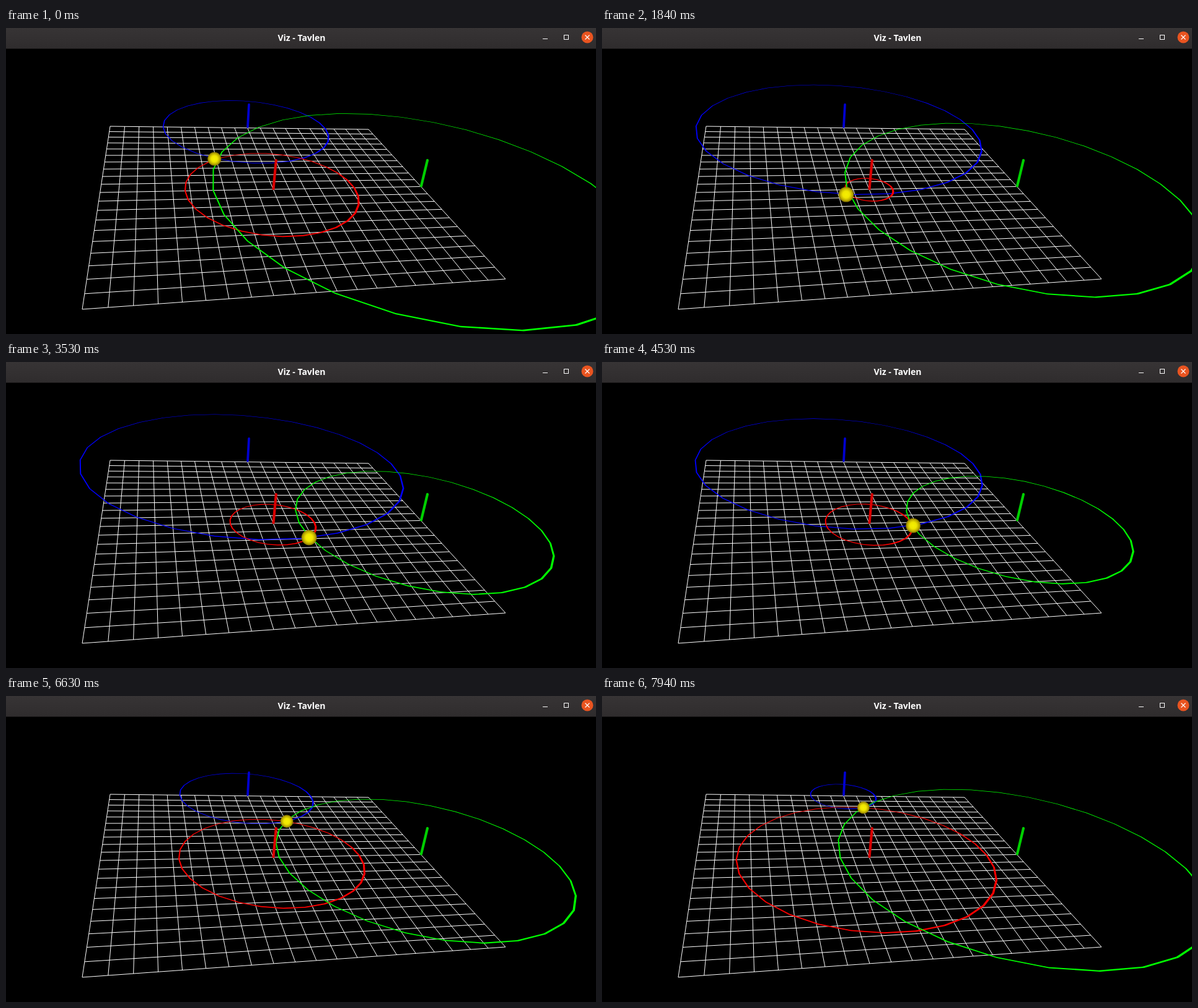
These frames come from a looping animation (952 by 495 pixels, 8 s). An HTML page:

```html
<!DOCTYPE html>
<html lang="en">
<head>
<meta charset="utf-8">
<title>Viz</title>
<style>
  html, body { margin: 0; width: 100%; height: 100%; overflow: hidden; background: #000; }
  svg { display: block; width: 100%; height: 100%; }
  text { font: bold 14px "Open Sans", "Noto Sans", sans-serif; fill: #fff; text-anchor: middle; }
</style>
</head>
<body>
<svg viewBox="0 0 952 495">
  <defs>
    <linearGradient id="bar" x2="0" y2="1">
      <stop offset="0" stop-color="#373435"/>
      <stop offset="1" stop-color="#2f2c2d"/>
    </linearGradient>
    <radialGradient id="glow">
      <stop offset="0" stop-color="#f6f000"/>
      <stop offset=".45" stop-color="#efe500"/>
      <stop offset=".75" stop-color="#c2b200"/>
      <stop offset="1" stop-color="#857200"/>
    </radialGradient>
  </defs>
  <rect width="952" height="495"/>
  <path id="grid" fill="none" stroke="#fff"/>
  <g id="rings" fill-rule="evenodd"></g>
  <g stroke-linecap="round" stroke-width="4.2">
    <path d="M390 160L392 124" stroke="#0000d0" stroke-width="3.8"/>
    <path d="M431.5 260L435.8 214" stroke="#d80000"/>
    <path d="M670 255.5L680 214" stroke="#00d000"/>
  </g>
  <circle id="ball" fill="url(#glow)"/>
  <rect width="952" height="33.5" fill="url(#bar)"/>
  <text x="477" y="21">Viz - Tavlen</text>
  <g fill="none" stroke="#fff">
    <path d="M866 17.5h8"/>
    <rect x="900.5" y="11.5" width="7" height="7"/>
    <circle cx="938" cy="15" r="9.5" fill="#e95420" stroke="none"/>
    <path d="M934.5 11.5l7 7m0-7l-7 7" stroke-width="1.2"/>
  </g>
</svg>
<script>
const LOOP = 8000, STEP = 77, CELLS = 20, SIDES = 30;
const BAND = 0.005, SKEW = 0.0006;
const beacons = [
  { u: 0.5, v: 0, color: '#00f' },
  { u: 0.5, v: 0.5, color: '#f00' },
  { u: 1, v: 0.5, color: '#0f0' }
];
// One value per second
const across = [0.354, 0.370, 0.446, 0.551, 0.618, 0.634, 0.616, 0.586, 0.553];
const drift = [-0.010, -0.009, -0.0085, -0.006, 0, 0.006, 0.0085, 0.002, 0.001];

const $ = id => document.getElementById(id);
const depth = (u, v) => 1 + 0.13541 * u - 0.43327 * v;

// Floor plane (unit square) to screen
function project(u, v) {
  const w = depth(u, v);
  return [(168 + 496.2 * u - 98.29 * v) / w, (159 + 27.21 * u + 98.86 * v) / w];
}

const point = (u, v) => project(u, v).map(n => n.toFixed(2)).join(' ');

function spline(keys, s) {
  const i = Math.min(Math.floor(s), keys.length - 2), f = s - i;
  const b = keys[i], c = keys[i + 1];
  const a = keys[i - 1] ?? 2 * b - c, d = keys[i + 2] ?? 2 * c - b;
  return b + f / 2 * (c - a + f * (2 * a - 5 * b + 4 * c - d + f * (3 * (b - c) + d - a)));
}

function loopPath(u, v, r) {
  const pts = [];
  for (let i = 0; i < SIDES; i++) {
    const q = i * 2 * Math.PI / SIDES;
    pts.push(point(u + r * Math.cos(q), v + r * Math.sin(q)));
  }
  return 'M' + pts.join('L') + 'Z';
}

// A flat band lying on the floor, slightly wider on its right side
const ring = (u, v, r) =>
  loopPath(u + SKEW, v, r + BAND / 2) + loopPath(u - SKEW, v, r - BAND / 2);

let lines = '';
for (let i = 0; i <= CELLS; i++) {
  const k = i / CELLS;
  lines += `M${point(k, 0)}L${point(k, 1)}M${point(0, k)}L${point(1, k)}`;
}
$('grid').setAttribute('d', lines);

for (const b of beacons) {
  b.path = document.createElementNS('http://www.w3.org/2000/svg', 'path');
  b.path.setAttribute('fill', b.color);
  $('rings').append(b.path);
}

function draw(time) {
  const t = Math.floor((time % LOOP + 16) / STEP) * STEP;
  const s = Math.min(t, LOOP - 1) / 1000;
  const u = spline(across, s);
  const v = 0.35 + 0.25 * Math.cos(2 * Math.PI * (s - 3.15) / 10.65);
  for (const b of beacons) {
    b.path.setAttribute('d', ring(b.u, b.v, Math.hypot(u - b.u, v - b.v)));
  }
  const [x, y] = project(u + spline(drift, s), v);
  $('ball').setAttribute('cx', x);
  $('ball').setAttribute('cy', y);
  $('ball').setAttribute('r', 10.2 / depth(u, v));
}

const start = performance.now();
function tick() {
  draw(performance.now() - start);
  requestAnimationFrame(tick);
}
tick();
</script>
</body>
</html>
```
